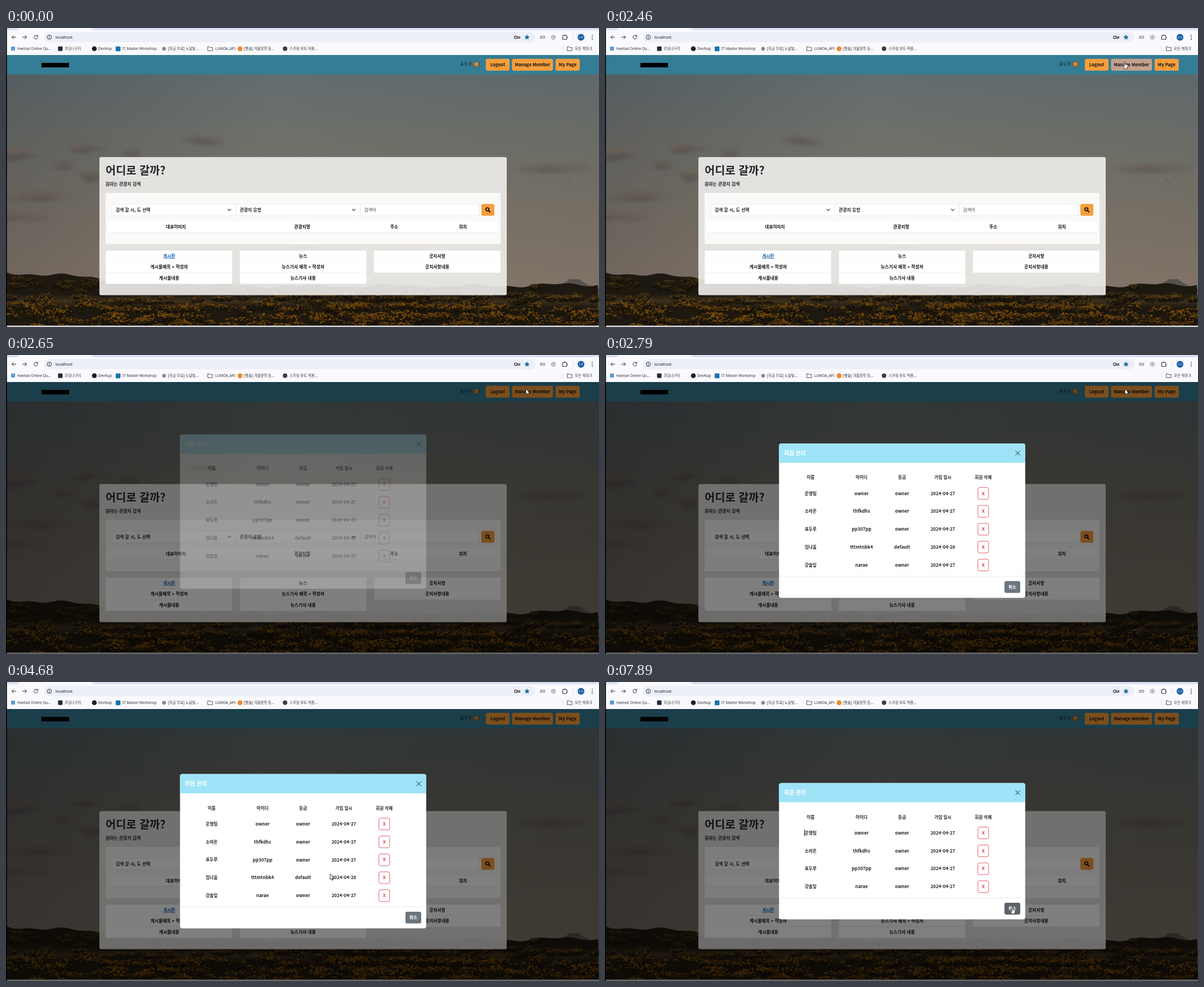
Animation, 1054 px wide and 531 px high, one loop 8 s. Source, as an HTML page with a canvas:

```html
<!DOCTYPE html>
<html lang="ko">
<head>
<meta charset="utf-8">
<title>회원 관리</title>
<style>
  html, body { margin: 0; width: 100%; height: 100%; overflow: hidden; background: #fff; }
  canvas, svg { position: absolute; left: 0; top: 0; width: 1054px; height: 531px; display: block; }
  text { font-family: "Noto Sans CJK KR", "Noto Sans CJK", "Noto Sans", sans-serif; white-space: pre; }
  .ui text { font-family: "Noto Sans", "Noto Sans CJK KR", "Noto Sans CJK", sans-serif; }
</style>
</head>
<body>
<canvas id="photo" width="1054" height="531"></canvas>
<svg id="stage" viewBox="0 0 1054 531" xmlns="http://www.w3.org/2000/svg"></svg>
<script>
const LOOP = 8000;
const $ = id => document.getElementById(id);

// ---------- backdrop photo ----------
function paintPhoto() {
  const c = $('photo').getContext('2d');
  let seed = 11;
  const rnd = () => (seed = (seed * 16807) % 2147483647) / 2147483647;
  const pick = list => list[rnd() * list.length | 0];
  const fill = (x0, y0, x1, y1, stops, box) => {
    const g = c.createLinearGradient(x0, y0, x1, y1);
    stops.forEach(([p, col]) => g.addColorStop(p, col));
    c.fillStyle = g;
    c.fillRect(...box);
  };
  const blob = (x, y, rx, ry, col) => {
    c.fillStyle = col;
    c.beginPath();
    c.ellipse(x, y, rx, ry, 0, 0, 7);
    c.fill();
  };

  fill(0, 82, 0, 455, [[0, '#626d6f'], [.3, '#6f706a'], [.7, '#7c7468'], [1, '#86786b']], [0, 48, 1054, 483]);
  fill(0, 0, 1054, 0, [[0, 'rgba(30,32,42,.2)'], [.45, 'rgba(30,32,42,0)'], [1, 'rgba(50,50,55,.08)']], [0, 48, 1054, 483]);

  // clouds: grey body with a faint warm upper edge
  const clouds = [[30, 224, 34, 13], [146, 214, 26, 8], [212, 223, 20, 4], [354, 200, 34, 7],
    [100, 243, 22, 5], [152, 264, 18, 10], [60, 300, 70, 8], [20, 335, 60, 9], [960, 250, 80, 6]];
  c.filter = 'blur(3px)';
  clouds.forEach(([x, y, rx, ry], i) => {
    const a = i < 6 ? .34 : .14;
    for (let k = 0; k < 7; k++) {
      const bx = x + (rnd() - .5) * rx * 1.4, by = y + (rnd() - .5) * ry, bw = rx * (.3 + rnd() * .3);
      blob(bx, by - ry * .3, bw, ry * .4, `rgba(128,108,98,${a * .7})`);
      blob(bx, by + ry * .2, bw, ry * .45, `rgba(84,80,80,${a})`);
    }
  });
  c.filter = 'none';

  const hill = (x, y, w, h, col) => {
    c.fillStyle = col;
    c.beginPath();
    c.moveTo(x - w, y + h);
    c.quadraticCurveTo(x - w * .3, y + h * .5, x - w * .12, y);
    c.lineTo(x + w * .12, y);
    c.quadraticCurveTo(x + w * .35, y + h * .6, x + w, y + h);
    c.fill();
  };
  hill(530, 387, 150, 75, '#6a625d');
  hill(1010, 446, 70, 24, '#57514d');
  c.strokeStyle = '#4f4f4d';
  c.lineWidth = .8;
  c.beginPath();
  c.moveTo(997, 267); c.lineTo(1000, 271); c.lineTo(1003, 276);
  c.moveTo(1026, 313); c.lineTo(1029, 316); c.lineTo(1031, 313);
  c.stroke();

  // trees and scrub
  const top = x => 434 + 24 * Math.min(1, x / 420) - 3 * Math.max(0, (x - 850) / 200)
    + 2.5 * Math.sin(x / 23) + 1.5 * Math.sin(x / 9);
  c.fillStyle = '#1e1910';
  c.beginPath();
  c.moveTo(0, 531);
  for (let x = 0; x <= 1054; x += 4) c.lineTo(x, top(x));
  c.lineTo(1054, 531);
  c.fill();
  fill(0, 474, 0, 496, [[0, 'rgba(92,72,42,0)'], [.5, 'rgba(92,72,42,.5)'], [1, 'rgba(92,72,42,0)']], [0, 474, 1054, 22]);

  // a bush is a heap of specks, lit on top and dark below
  const bush = (x, y, w, h, lit, shade) => {
    for (let i = 0; i < 70; i++) {
      const a = rnd() * 6.3, r = Math.sqrt(rnd()), dy = Math.sin(a) * r;
      const col = dy + rnd() * .9 < .25 ? pick(lit) : pick(shade);
      blob(x + Math.cos(a) * r * w, y + dy * h, .6 + rnd() * 1.7, .5 + rnd() * 1.1, col);
    }
  };
  const dark = ['#18130b', '#211a0e', '#120e08'];
  const layer = (n, y, spread, w, h, lit) => {
    for (let i = 0; i < n; i++)
      bush(rnd() * 1054, y + (rnd() - .5) * spread, w * (.6 + rnd() * .8), h * (.7 + rnd() * .6), lit, dark);
  };
  for (let i = 0; i < 90; i++) {
    const x = rnd() * 1054;
    bush(x, top(x) + 4 + rnd() * 24, 14, 6, ['#2c2414', '#372a13', '#44310f'], dark);
  }
  layer(60, 482, 14, 18, 6, ['#4a3414', '#5c4016', '#3b2b12']);
  layer(70, 499, 12, 20, 8, ['#65410c', '#4c330e', '#7a4c0c']);
  layer(70, 516, 14, 22, 9, ['#6b430a', '#82500b', '#4b310c']);
  layer(40, 528, 8, 20, 7, ['#5c3b0b', '#76490b', '#3d290c']);
}

// ---------- markup helpers ----------
const rect = (x, y, w, h, fill, r = 0, extra = '') =>
  `<rect x="${x}" y="${y}" width="${w}" height="${h}" rx="${r}" fill="${fill}" ${extra}/>`;
const text = (x, y, s, size, weight = 400, fill = '#000', anchor = 'start', extra = '') =>
  `<text x="${x}" y="${(y + size * .36).toFixed(2)}" font-size="${size}" font-weight="${weight}" fill="${fill}" text-anchor="${anchor}" ${extra}>${s}</text>`;
const mid = (x, y, s, size = 7.7, weight = 700, fill = '#111', extra = '') => text(x, y, s, size, weight, fill, 'middle', extra);
const line = (d, col, w = 1, extra = '') =>
  `<path d="${d}" fill="none" stroke="${col}" stroke-width="${w}" stroke-linecap="round" stroke-linejoin="round" ${extra}/>`;
const dot = (x, y, r, fill, extra = '') => `<circle cx="${x}" cy="${y}" r="${r}" fill="${fill}" ${extra}/>`;
const folder = x => line(`M${x - 4} 33.5h3l1 1.2h4.2v5.6h-8.2z`, '#444', .9);

function browser() {
  const dark = '#333';
  const marks = [[20, 'Haetsal Online Qu...'], [104, '코딩너구리'], [164, 'DevNup'], [207, 'IT Master Workshop'],
    [288, '[지금 무료] 노달빛...'], [372, 'LUMOA_API'], [423, '[햇솔] 겨울방학 등...'], [504, '스프링 부트 적용...'], [1011, '모든 북마크']];
  return '<g class="ui">' + rect(0, 0, 1054, 48, '#f9f9fe') + rect(0, 0, 1054, 4, '#dbe0f3')
    + '<path d="M19 4q4 0 4-4H153q0 4 4 4z" fill="#f9f9fe"/>'
    + rect(68, 7.2, 873, 18, '#eceef8', 9)
    + line('M17.5 16.3h-7M13.5 13.2l-3.1 3.1 3.1 3.1', dark)
    + line('M29.5 16.3h7M33.4 13.2l3.1 3.1-3.1 3.1', dark)
    + line('M56 14.3a3.4 3.4 0 1 0 .5 2.6M56.4 12.6v2.2h-2.2', dark)
    + dot(77, 16.4, 3.8, 'none', 'stroke="#333"') + line('M77 16v2.2M77 14.3v.1', dark)
    + text(88, 16.2, 'localhost', 7.2, 400, '#222')
    + dot(906, 16.4, 2.3, 'none', 'stroke="#444" stroke-width="1.3"') + line('M908.5 15.6h5v2.2h-4.2M911 17.5v1.2', '#444', 1.2)
    + '<path d="M926 11.5l1.4 3 3.3.4-2.4 2.3.6 3.3-2.9-1.6-2.9 1.6.6-3.3-2.4-2.3 3.3-.4z" fill="#20719c"/>'
    + line('M949.5 14.5h3M949.5 16.5h3M949.5 18.3h3M954.5 14.5h3v3.8h-3z', '#666', .9)
    + dot(973, 16.4, 3.7, '#e3e3e8', 'stroke="#888" stroke-width=".9"') + dot(973, 16, 1.5, '#999')
    + line('M989.5 13.5h2.3q0-1.5 1.2-1.5t1.2 1.5h2.3v2.3q1.5 0 1.5 1.1t-1.5 1.1v2.3h-7z', dark, 1.1)
    + line('M1008 12v8', '#cfd8ee', .8)
    + dot(1022, 16.4, 6, '#155fa5') + mid(1022, 16.2, '두루', 4.6, 400, '#dce9f5')
    + [12.8, 16.4, 20].map(y => dot(1042, y, .9, dark)).join('')
    + rect(9, 33, 7, 7, '#5b9bd5') + rect(92.5, 32.8, 8, 8, '#1e2a3c', 1) + dot(157, 36.8, 4.3, '#1b1f23')
    + rect(195, 32.8, 8.4, 8.4, '#1673ae', 1) + dot(281, 36.8, 3.4, '#8a8a8e') + folder(363)
    + dot(416, 36.8, 4.4, '#f08a2c') + dot(496, 36.8, 4, '#3b3d42') + folder(1002) + line('M989 32v9', '#cfd8ee', .8)
    + marks.map(([x, s]) => text(x, 36.6, s, 6.4, 400, '#333')).join('') + '</g>';
}

const ORANGE = '#f79e3d', CONTROL = 20.9;
const button = (x, w, label, id = '') => rect(x, 54.8, w, CONTROL, ORANGE, 3, id) + mid(x + w / 2, 65, label, 7.7);

function page() {
  const border = '#dee2e6', ink = '#212529';
  const field = (x, w, s, col, weight) => rect(x, 312.6, w, CONTROL, '#fff', 3, `stroke="${border}" stroke-width=".6"`)
    + text(x + 7, 323, s, 7.8, weight, col);
  const chevron = x => line(`M${x - 2.7} 321.7l2.7 2.7 2.7-2.7`, '#343a40', 1.1);
  const list = (x, c, items) => items.map((s, i) => rect(x, 395.3 + i * 19.75, 224.7, 19.75, '#fff')
    + line(`M${x} ${415 + i * 19.75}h224.7`, border, .6)
    + (i === 0 && s === '게시판' ? mid(c, 404.8, s, 7.8, 700, '#1766b5', 'text-decoration="underline"')
      : mid(c, 404.8 + i * 19.75, s, 7.8))).join('');
  return rect(0, 48, 1054, 34.3, '#347d96')
    + rect(63, 62, 49, 8, '#000')
    + text(807, 64.6, '표두루', 7.7, 500, '#1c2428')
    + dot(836, 64.5, 4.8, ORANGE, 'stroke="#26261f" stroke-width=".9"') + dot(834.3, 63.2, .7, '#222') + dot(837.7, 63.2, .7, '#222')
    + line('M833.6 65.6q2.4 2.7 4.8 0', '#222', .8)
    + button(852.8, 42.2, 'Logout') + button(899.4, 72.8, 'Manage Member', 'id="manage"') + button(976.8, 43, 'My Page')
    + rect(166, 229.3, 724, 245.2, 'rgba(242,241,239,.89)', 3)
    + text(177, 252.6, '어디로 갈까?', 19.8, 700, ink)
    + text(177, 277, '원하는 관광지 검색', 7.9, 700, ink)
    + rect(177, 293, 702, 91, 'rgba(255,255,255,.8)', 2)
    + field(188, 220.5, '검색 할 시, 도 선택', ink, 700) + chevron(397)
    + field(408.5, 221, '관광지 유형', ink, 700) + chevron(618)
    + field(629.5, 211.5, '검색어', '#495057', 500)
    + rect(845, 312.6, 23, CONTROL, ORANGE, 3)
    + dot(855.6, 322, 2.8, 'none', 'stroke="#000" stroke-width="1.5"') + line('M857.8 324.3l2.5 2.5', '#000', 1.7)
    + rect(181, 344, 694, 19.5, '#fff') + line('M181 363.6h694', border, .7)
    + [[302, '대표이미지'], [526.5, '관광지명'], [690, '주소'], [812, '위치']].map(([x, s]) => mid(x, 353.6, s)).join('')
    + list(177.3, 290, ['게시판', '게시물제목 + 작성자', '게시물내용'])
    + list(415.8, 528, ['뉴스', '뉴스기사 제목 + 작성자', '뉴스기사 내용'])
    + list(654.2, 766.5, ['공지사항', '공지사항내용'])
    + rect(0, 528.5, 1054, 2.5, '#d6d6d6');
}

// ---------- member dialog, drawn from its own top edge ----------
const COLS = [365.5, 456, 528, 600.5, 672.3], ROW0 = 88.6, ROW = 31.8, FULL = 274;
const MEMBERS = [['운영팀', 'owner', 'owner', '27'], ['소라온', 'thfkdhs', 'owner', '27'], ['표두루', 'pp307pp', 'owner', '27'],
  ['임나울', 'tttmtnbk4', 'default', '28'], ['강솔잎', 'narae', 'owner', '27']];

function dialog() {
  const heads = ['이름', '아이디', '등급', '가입 일시', '회원 삭제'];
  const row = ([name, login, rank, day], i) => `<g id="row${i}">`
    + [name, login, rank, '2024-04-' + day].map((s, k) => mid(COLS[k], 0, s, k ? 8 : 7.7, 700, '#212529')).join('')
    + rect(662.8, -10.4, 19, CONTROL, '#fff', 3, `id="del${i}" stroke="#dc3545" stroke-width=".8"`)
    + mid(COLS[4], 0, 'X', 7.6, 700, '#dc3545', `id="x${i}"`) + '</g>';
  return rect(309.3, 0, 437.6, FULL, '#fff', 4, 'id="sheet"')
    + '<path d="M309.3 34.2V4q0-4 4-4H742.9q4 0 4 4V34.2z" fill="#9fe3f8"/>'
    + text(318, 17, '회원 관리', 9.8, 700, '#fff')
    + line('M729.9 13.4l7.4 7.4M737.3 13.4l-7.4 7.4', '#44606a', 1.1)
    + heads.map((s, k) => mid(COLS[k], 60.4, s, 7.6, 700, '#212529')).join('')
    + MEMBERS.map(row).join('')
    + '<g id="foot">' + line('M309.3 0H746.9', '#dee2e6', .7)
    + rect(710, 8.7, 28, CONTROL, '#6c757d', 3, 'id="cancel"') + mid(724, 19, '취소', 7.7, 700, '#fff') + '</g>';
}

const CURSORS = {
  arrow: '<path d="M0 0V10.2L2.3 8.1 3.9 11.6 5.4 10.9 3.9 7.5H7Z" fill="#fff" stroke="#111" stroke-width=".8"/>',
  hand: '<path d="M-1 .8a1 1 0 0 1 2 0V4.6L4.2 5.3Q5.6 5.8 5.3 7.6L4.4 12H-.6L-3.3 8Q-3.7 6.4-2.4 6.8L-1 8Z" fill="#fff" stroke="#111" stroke-width=".8"/>',
  beam: '<path d="M-1.8-4.6h3.6M0-4.6v9.2M-1.8 4.6h3.6" stroke="#111" stroke-width=".9"/>'
};

paintPhoto();
$('stage').innerHTML = page() + rect(0, 48, 1054, 483, '#000', 0, 'id="shade"')
  + `<g id="modal">${dialog()}</g>` + rect(0, 0, 1, 11, '#000', 0, 'id="caret"') + browser() + rect(0, 0, 1.6, 531, '#000')
  + '<g id="pointer">' + Object.entries(CURSORS).map(([k, v]) => `<g id="${k}">${v}</g>`).join('') + '</g>';

// ---------- timeline ----------
// pointer: ms, x, y
const PATH = [[310, 956, 414], [520, 910, 388], [730, 859, 340], [900, 858, 300], [1070, 867, 262], [1280, 867, 212], [1490, 872, 167],
  [1650, 915, 125], [1790, 956, 90], [1930, 924, 60], [3150, 924, 60], [3420, 704, 299], [3600, 555, 372], [3800, 425, 384],
  [3980, 364, 352], [4060, 359, 348], [4240, 460, 372], [4420, 640, 377], [4520, 673, 360], [4640, 620, 342], [4820, 400, 344],
  [4890, 367, 350], [5040, 450, 374], [5210, 576, 349], [5390, 680, 376], [5520, 696, 358], [5680, 655, 348], [5900, 667, 348],
  [7170, 667, 348], [7400, 706, 383], [7610, 723, 400], [7750, 723, 400], [7890, 724, 400]];

function tangent(i, k) {
  const a = PATH[i - 1], p = PATH[i], b = PATH[i + 1];
  const still = (u, v) => u[1] === v[1] && u[2] === v[2];
  return !a || !b || still(a, p) || still(p, b) ? 0 : (b[k] - a[k]) / (b[0] - a[0]);
}
function pointerAt(t) {
  const last = PATH.length - 1;
  if (t >= PATH[last][0]) return PATH[last].slice(1);
  if (t <= PATH[0][0]) return PATH[0].slice(1);
  const i = PATH.findIndex(p => p[0] > t) - 1, p = PATH[i], q = PATH[i + 1];
  const d = q[0] - p[0], s = (t - p[0]) / d, s2 = s * s, s3 = s2 * s;
  return [1, 2].map(k => (2 * s3 - 3 * s2 + 1) * p[k] + (s3 - 2 * s2 + s) * d * tangent(i, k)
    + (3 * s2 - 2 * s3) * q[k] + (s3 - s2) * d * tangent(i + 1, k));
}

const SHADE = 2466, OPEN = 2616, DELETE = 6530;
const ramp = (t, a, b) => Math.min(1, Math.max(0, (t - a) / (b - a)));
const mix = (a, b, k) => `rgb(${a.map((v, i) => Math.round(v + (b[i] - v) * k))})`;
const near = (x, y, cx, cy, w, h) => Math.abs(x - cx) <= w && Math.abs(y - cy) <= h;
const show = (id, on) => $(id).setAttribute('visibility', on ? 'visible' : 'hidden');
const move = (id, x, y) => $(id).setAttribute('transform', `translate(${x.toFixed(2)} ${y.toFixed(2)})`);
const paint = (id, col) => $(id).setAttribute('fill', col);

// cubic-bezier(0, 0, .58, 1)
function easeOut(p) {
  let lo = 0, hi = 1;
  for (let i = 0; i < 20; i++) {
    const u = (lo + hi) / 2;
    if (3 * (1 - u) * u * u * .58 + u * u * u < p) lo = u; else hi = u;
  }
  return 3 * (1 - lo) * lo * lo + lo * lo * lo;
}

function draw(t) {
  const [x, y] = pointerAt(t);
  const gone = t >= DELETE, height = FULL - (gone ? ROW : 0), top = 300.5 - height / 2;
  const open = t >= OPEN;
  let kind = 'arrow';

  $('shade').setAttribute('opacity', .5 * ramp(t, SHADE, OPEN));
  $('modal').setAttribute('opacity', ramp(t, OPEN, OPEN + 150));
  move('modal', 0, top - 27.4 * (1 - easeOut(ramp(t, OPEN, OPEN + 300))));
  $('sheet').setAttribute('height', height);
  move('foot', 0, height - 38.3);

  paint('manage', mix([247, 158, 61], [196, 161, 140], ramp(t, 1930, 2060) - ramp(t, SHADE, OPEN)));
  if (t < SHADE && near(x, y, 935.8, 65.3, 36.4, 10.3)) kind = 'hand';

  MEMBERS.forEach((m, i) => {
    const slot = gone && i > 3 ? i - 1 : i, ry = ROW0 + slot * ROW, live = !(gone && i === 3);
    move('row' + i, 0, ry);
    $('row' + i).setAttribute('display', live ? 'inline' : 'none');
    const over = open && live && near(x, y, COLS[4], top + ry, 9.5, 10.2);
    paint('del' + i, over ? '#dc3545' : '#fff');
    paint('x' + i, over ? '#fff' : '#dc3545');
    if (over) kind = 'hand';
    else if (open && live && COLS.slice(0, 4).some(c => near(x, y, c, top + ry, 18, 5.5))) kind = 'beam';
  });
  const onCancel = open && near(x, y, 724, top + height - 19.1, 14, 10.4);
  paint('cancel', onCancel ? '#5c636a' : '#6c757d');
  if (onCancel) kind = 'hand';

  // text caret blinks in the row that was clicked
  const early = (t >= 5210 && t < 5740) || (t >= 6270 && t < DELETE);
  const late = (t >= 6670 && t < 7200) || t >= 7750;
  show('caret', early || late);
  move('caret', early ? 576 : 354, early ? 342 : 262.5);

  show('pointer', t >= 310);
  Object.keys(CURSORS).forEach(k => $(k).setAttribute('display', k === kind ? 'inline' : 'none'));
  move('pointer', x, y);
}

function tick() {
  draw(performance.now() % LOOP);
  requestAnimationFrame(tick);
}
tick();
</script>
</body>
</html>
```
